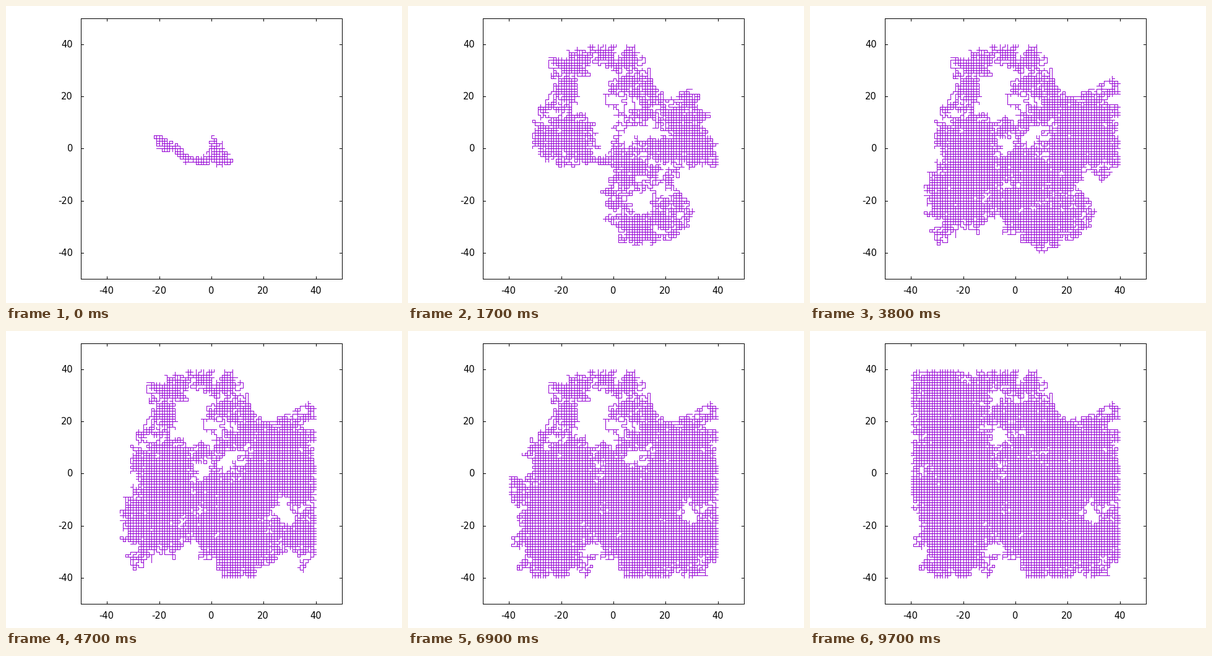
Recreate the animation shown at these times as a matplotlib script. Size 640 by 480 pixels, loop 9.8 s.

```python
import math
import random

import matplotlib.pyplot as plt
import numpy as np
from matplotlib.animation import FuncAnimation

WIDTH, HEIGHT, DPI = 640, 480, 100
FRAMES, INTERVAL = 98, 100
LEFT, RIGHT, TOP, BOTTOM = 121, 543, 20, 441
WALL = 40
STEPS_PER_FRAME = 1000
PURPLE, BLACK = (148, 0, 211), (0, 0, 0)
TICKS = range(-40, 41, 20)

# Where the walk tends to be: time in frames, x, y
STOPS = [
    (0, 0, 0), (.3, 7, -4), (.6, -7, -5), (1, -22, 4), (2, -12, 0),
    (4.2, -29, 14), (4.4, -16, 18), (5, -21, 32), (5.8, -7, 36),
    (6.4, 6, 34), (6.9, 6, 24), (8.2, 20, 13), (11.8, 35, 0), (14, 6, -2),
    (15.2, 1, -22), (16, 10, -32), (16.6, 18, -34), (17.5, 20, -23),
    (20, 14, -10), (23.5, 33, 6), (25.8, 15, 17), (27.2, -20, 0),
    (28.2, -31, -20), (29.5, -16, -26), (33, -12, -8), (40, 8, -33),
    (43, 14, -8), (45, 33, 4), (46.2, 35, -22), (49, 33, -33), (58, 2, 0),
    (61, -18, -12), (65, -28, -32), (70, -32, 4), (76, -31, 33),
    (79, -23, 26), (85, -24, -30), (90, -20, 5), (92.5, -12, 24),
    (94, 8, 20), (98, 10, -10),
]


def px(x):
    return math.floor(LEFT + (RIGHT - LEFT) * (x + 50) / 100 + .5)


def py(y):
    return math.ceil(TOP + (BOTTOM - TOP) * (50 - y) / 100 - .5)


def pulls():
    """Yield target x, y and pull strength for every step of the walk."""
    for (t0, x0, y0), (t1, x1, y1) in zip(STOPS, STOPS[1:]):
        speed = math.hypot(x1 - x0, y1 - y0) / (t1 - t0)
        spread = min(max(55 / speed, 1.3), 6.5)  # slow legs wander wider
        count = round((t1 - t0) * STEPS_PER_FRAME)
        for u in np.linspace(0, 1, count, endpoint=False).tolist():
            yield x0 + (x1 - x0) * u, y0 + (y1 - y0) * u, .25 / spread ** 2


def walk(seed):
    """Random walk between the walls; gives the frame that inks each pixel."""
    rng = random.Random(seed)
    ink = np.full((HEIGHT, WIDTH), FRAMES)
    pos = [0, 0]
    for step, (tx, ty, pull) in enumerate(pulls()):
        axis = rng.randrange(2)
        bias = min(max(pull * ((tx, ty)[axis] - pos[axis]), -.45), .45)
        new = pos.copy()
        new[axis] += 1 if rng.random() < .5 + bias else -1
        # No step beyond a wall or along it
        if abs(new[axis]) > WALL or abs(pos[1 - axis]) == WALL:
            continue
        xs = sorted((px(pos[0]), px(new[0])))
        ys = sorted((py(pos[1]), py(new[1])))
        part = ink[ys[0]:ys[1] + 1, xs[0]:xs[1] + 1]
        np.minimum(part, step // STEPS_PER_FRAME, out=part)
        pos = new
    return ink


def paint_axes():
    page = np.full((HEIGHT, WIDTH, 3), 255, np.uint8)
    page[[TOP, BOTTOM], LEFT:RIGHT + 1] = BLACK
    page[TOP:BOTTOM + 1, [LEFT, RIGHT]] = BLACK
    for t in TICKS:
        page[TOP:TOP + 5, px(t)] = BLACK
        page[BOTTOM - 4:BOTTOM, px(t)] = BLACK
        page[py(t), LEFT:LEFT + 5] = BLACK
        page[py(t), RIGHT - 4:RIGHT] = BLACK
    return page


page, ink = paint_axes(), walk(12)

fig = plt.figure(figsize=(WIDTH / DPI, HEIGHT / DPI), dpi=DPI,
                 facecolor="white")
ax = fig.add_axes([0, 0, 1, 1])
ax.axis("off")
picture = ax.imshow(page, aspect="auto", interpolation="nearest")


def label(x, y, text, align):
    fig.text(x / WIDTH, 1 - y / HEIGHT, text, ha=align, va="baseline",
             family="DejaVu Sans", fontsize=10.5, color="black")


for t in TICKS:
    label(px(t) - .5, 465, str(t), "center")
    label(108, py(t) + 5, str(t), "right")


def update(frame):
    shot = page.copy()
    shot[ink <= frame] = PURPLE
    picture.set_data(shot)
    return [picture]


anim = FuncAnimation(fig, update, frames=FRAMES, interval=INTERVAL,
                     repeat=True, repeat_delay=0)
plt.show()
```
